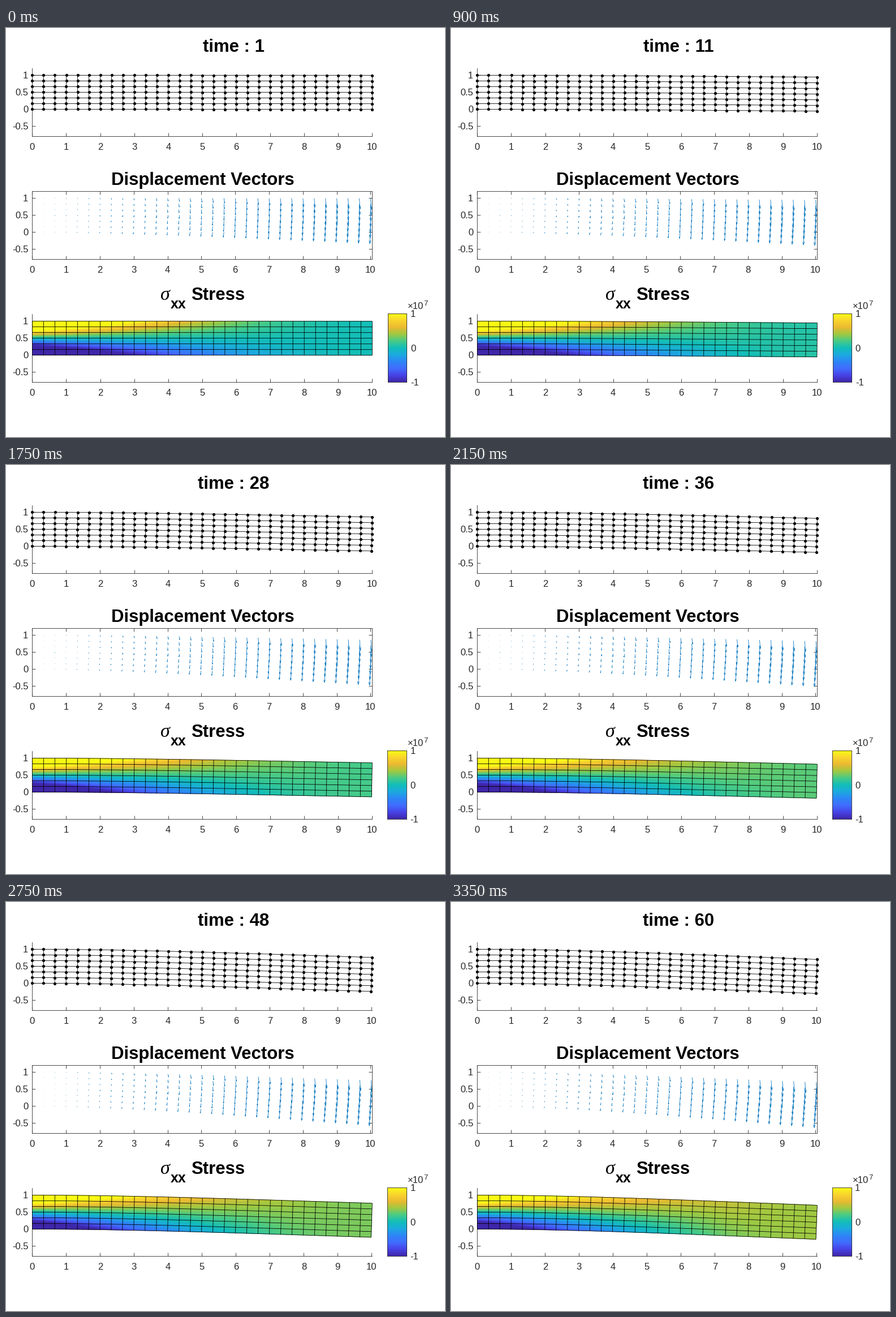
A matplotlib script for the animation above (3800 ms loop, 776 px wide and 722 px high).

```python
import numpy as np
import matplotlib.pyplot as plt
from matplotlib.animation import FuncAnimation
from matplotlib.collections import LineCollection
from matplotlib.colors import LinearSegmentedColormap

W, H, DPI = 776, 722, 100
PX = 72 / DPI               # points per pixel
FRAMES, STEP = 76, 50
HOLD, LAST = 7, 60          # still frames at the start, final counter value
DARK = "#262626"
BLUE = "#0072bd"
THIN = 0.82 * PX
ARROW = 20 / 60             # longest arrow in data units

plt.rcParams["font.family"] = "Liberation Sans"

# Evenly spaced key colours from indigo to yellow
CMAP = LinearSegmentedColormap.from_list("heat", (
    "#3e26a8 #4743e7 #416dfe #2d86f7 #1caadf #12beb9 "
    "#48cb86 #9fc942 #eaba31 #fad42e #f9fb15").split())

fig = plt.figure(figsize=(W / DPI, H / DPI), dpi=DPI, facecolor="white")


def rect(left, top, right, bottom):
    return [left / W, 1 - bottom / H, (right - left) / W, (bottom - top) / H]


def label(x, y, text, size=31.1, **kw):
    return fig.text(x / W, 1 - y / H, text, fontsize=size * PX,
                    va="baseline", **kw)


def style(ax):
    for side in ax.spines.values():
        side.set(color=DARK, linewidth=THIN)
    ax.tick_params(direction="in", length=6 * PX, width=THIN, color=DARK,
                   labelcolor=DARK, labelsize=16.67 * PX)


def panel(row, box=False):
    top = 71.4 + 217 * row
    ax = fig.add_axes(rect(46.4, top, 647.4, top + 120))
    style(ax)
    ax.set(xlim=(0, 10), ylim=(-0.8, 1.2))
    ax.set_xticks(range(11))
    ax.set_yticks([-0.5, 0, 0.5, 1], ["-0.5", "0", "0.5", "1"])
    ax.tick_params(axis="x", pad=11.5 * PX, top=box)
    ax.tick_params(axis="y", pad=7 * PX, right=box)
    ax.spines[["top", "right"]].set_visible(box)
    ax.set_axisbelow(True)
    return ax


def grid(nx, ny):
    return np.meshgrid(np.linspace(0, 10, nx + 1), np.linspace(0, 1, ny + 1))


def bend(x, y):
    """Cantilever displacement for a unit tip deflection."""
    s = x / 10
    v = -(s**4 - 4 * s**3 + 6 * s**2) / 3
    slope = -(4 * s**3 - 12 * s**2 + 12 * s) / 30
    return -(y - 0.5) * slope, v


def stress(x, y, load):
    bending = 1.95 * (1 - x / 10)**2 + 0.5 * np.exp(-x / 1.5)
    axial = 0.4 * np.minimum(x / 7.5, 1)
    return (1 - 0.25 * load) * bending * (2 * y - 1) + load * axial


def mesh_lines(x, y):
    rows = np.stack([x, y], axis=-1)
    return list(rows) + list(rows.transpose(1, 0, 2))


def arrows(x, y, u, v):
    tail = np.stack([x, y], axis=-1).reshape(-1, 2)
    d = ARROW * np.stack([u, v], axis=-1).reshape(-1, 2)
    side = 0.08 * d[:, ::-1] * [-1, 1]
    tip = tail + d
    back = tip - 0.27 * d
    shafts = np.stack([tail, tip], axis=1)
    heads = np.stack([back + side, tip, back - side], axis=1)
    return list(shafts) + list(heads)


def add_lines(ax, color, **kw):
    lines = LineCollection([], colors=color, linewidths=THIN, **kw)
    return ax.add_collection(lines, autolim=False)


# Panels
ax_mesh = panel(0)
ax_disp = panel(1, box=True)
ax_stress = panel(2)
ax_disp.set_xlim(0, 10.05)

X, Y = grid(30, 6)
U, V = bend(X, Y)
FX, FY = grid(60, 24)
FU, FV = bend(FX, FY)

wire = add_lines(ax_mesh, "black", clip_on=False)
nodes, = ax_mesh.plot([], [], "ko", ms=5.2 * PX, mew=0, clip_on=False)
quiver = add_lines(ax_disp, BLUE)
edges = add_lines(ax_stress, "black", clip_on=False, zorder=3)
fill = []

# Colour bar
bar = fig.add_axes(rect(675, 504.4, 708.4, 625.4))
style(bar)
bar.imshow(np.linspace(-1, 1, 256)[:, None], cmap=CMAP, aspect="auto",
           origin="lower", extent=(0, 1, -1, 1), interpolation="nearest")
bar.set_xticks([])
bar.set_yticks([-1, 0, 1], ["-1", "0", "1"])
bar.tick_params(axis="y", left=False, labelleft=False, labelright=True,
                pad=6.5 * PX)
label(709.5, 496, "×10", 16.67, color=DARK)
label(738, 490, "7", 13.3, color=DARK)

# Titles
title = label(402, 42, "", ha="center", weight="bold")
label(347.5, 277, "Displacement Vectors", ha="center", weight="bold")
label(273, 480, "σ", 34, family="Liberation Serif", style="italic")
label(291, 495, "xx", 24.9, weight="bold")
label(327, 480, "Stress", weight="bold")


def draw(frame):
    n = int(np.clip(frame - HOLD, 1, LAST))
    load = n / LAST
    tip = 0.3 * load
    x, y = X + tip * U, Y + tip * V

    title.set_text(f"time : {n}")
    lines = mesh_lines(x, y)
    wire.set_segments(lines)
    edges.set_segments(lines)
    nodes.set_data(x.ravel(), y.ravel())
    quiver.set_segments(arrows(x, y, U, V))

    if fill:
        fill.pop().remove()
    fill.append(ax_stress.pcolormesh(
        FX + tip * FU, FY + tip * FV, stress(FX, FY, load),
        shading="gouraud", cmap=CMAP, vmin=-1, vmax=1, zorder=2))

    for ax in (ax_mesh, ax_stress):
        ax.set(xlim=(0, x.max()), ylim=(-0.8, 1.2))
    bar.set_position(rect(675 - 1.5 * load, 504.4,
                          708.4 - 0.7 * load, 625.4))
    return []


anim = FuncAnimation(fig, draw, frames=FRAMES, interval=STEP, repeat=True,
                     repeat_delay=0, cache_frame_data=False)
plt.show()
```
